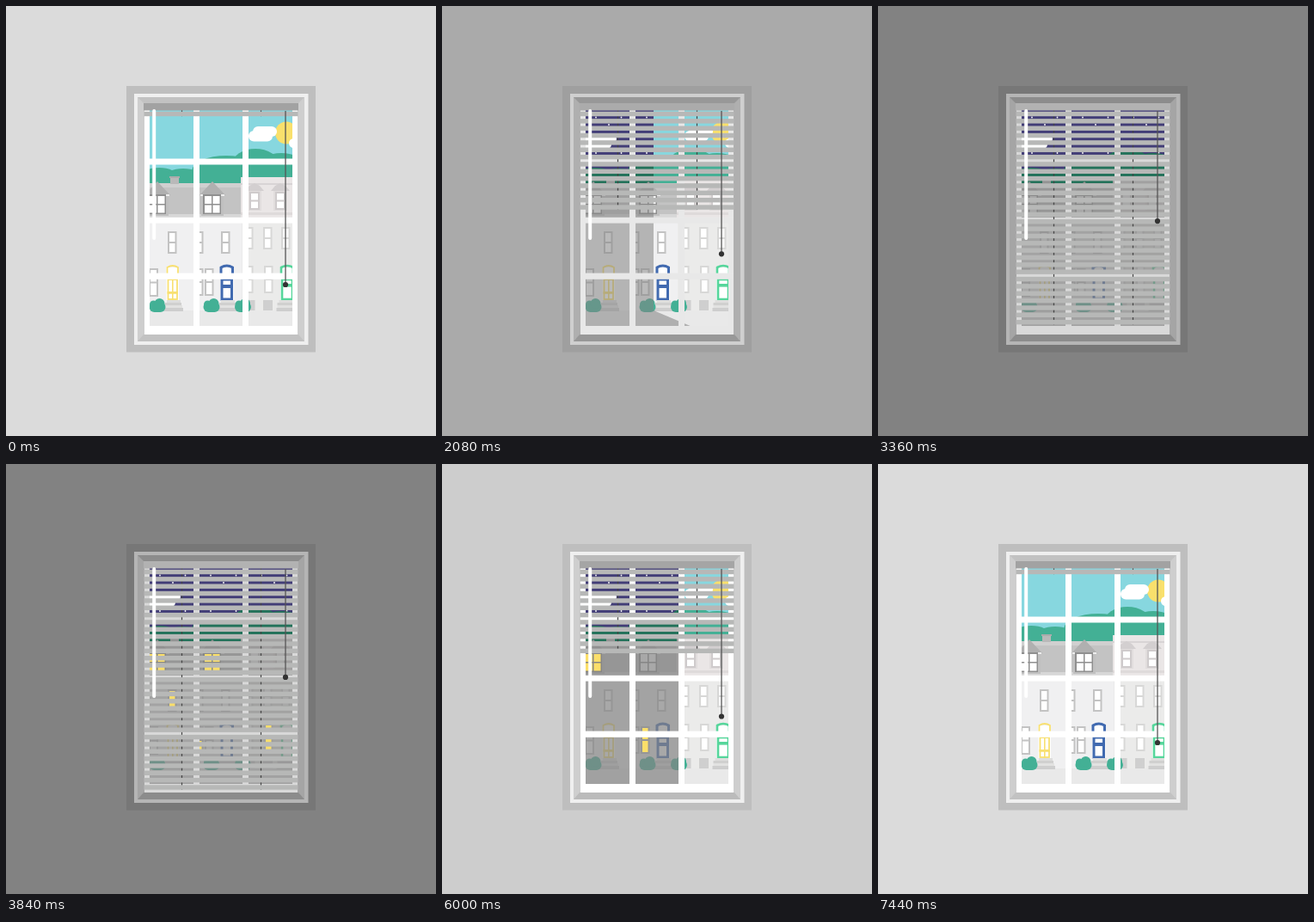
Animation of 500 by 500 pixels, one loop 7680 ms. Source, as an HTML page with a canvas:

```html
<!DOCTYPE html>
<html lang="en">
<head>
<meta charset="utf-8">
<title>Window blind</title>
<style>
html, body { margin: 0; width: 100%; height: 100%; overflow: hidden; background: #dbdbdb; }
canvas { display: block; width: 100vw; height: 100vh; }
</style>
</head>
<body>
<canvas id="stage" width="500" height="500"></canvas>
<script>
const ctx = document.getElementById('stage').getContext('2d');
const LOOP = 7680, STEP = 80, PITCH = 8.35, SLATS = 30;
const LIT = '#fbdf6a';
let dim = 0; // how far scene colours are mixed towards night grey

const clamp = (v, lo, hi) => Math.min(hi, Math.max(lo, v));
const grey = v => { v = Math.round(v); return `rgb(${v},${v},${v})`; };

// Linear interpolation through [time, value] points
function track(t, keys) {
  if (t <= keys[0][0]) return keys[0][1];
  for (let i = 1; i < keys.length; i++) {
    const [t0, a] = keys[i - 1], [t1, b] = keys[i];
    if (t <= t1) return a + (b - a) * (t - t0) / (t1 - t0);
  }
  return keys[keys.length - 1][1];
}

function tint(hex) {
  if (!dim) return hex;
  const n = parseInt(hex.slice(1), 16);
  const mix = s => Math.round(((n >> s) & 255) * (1 - dim) + 130 * dim);
  return `rgb(${mix(16)},${mix(8)},${mix(0)})`;
}

function box(c, x, y, w, h) {
  ctx.fillStyle = c;
  ctx.fillRect(x, y, w, h);
}
const rect = (c, x, y, w, h) => box(tint(c), x, y, w, h);

function shape(c, pts) {
  ctx.fillStyle = c;
  ctx.beginPath();
  for (let i = 0; i < pts.length; i += 2) ctx.lineTo(pts[i], pts[i + 1]);
  ctx.fill();
}
const poly = (c, ...pts) => shape(tint(c), pts);

function oval(c, x, y, rx, ry = rx) {
  ctx.fillStyle = c;
  ctx.beginPath();
  ctx.ellipse(x, y, rx, ry, 0, 0, Math.PI * 2);
  ctx.fill();
}

function pill(c, x, y, w, h) {
  ctx.fillStyle = c;
  ctx.beginPath();
  ctx.roundRect(x, y, w, h, h / 2);
  ctx.fill();
}

function line(c, w, x0, y0, x1, y1, cap = 'butt') {
  ctx.strokeStyle = c;
  ctx.lineWidth = w;
  ctx.lineCap = cap;
  ctx.beginPath();
  ctx.moveTo(x0, y0);
  ctx.lineTo(x1, y1);
  ctx.stroke();
}

function sashWindow(x, y, w, h, frame, lit) {
  rect(frame, x, y, w, h);
  const pane = lit ? LIT : tint('#ffffff'), ph = (h - 6) / 2;
  box(pane, x + 2, y + 2, w - 4, ph);
  box(pane, x + 2, y + 4 + ph, w - 4, ph);
}

function dormer(x, lit) {
  poly('#b0b0b0', x - 15, 220, x, 204, x + 15, 220);
  rect('#c0c0c0', x - 13, 219, 26, 25);
  rect('#ededed', x - 14, 219, 28, 2);
  rect('#8f8f8f', x - 11, 219, 21, 23);
  for (const dx of [-9, 0.5])
    for (const dy of [221, 231.5]) box(lit ? LIT : tint('#ffffff'), x + dx, dy, 8, 9);
}

function smallDormer(x) {
  poly('#d3cfd0', x - 11, 215, x - 6, 209, x, 206, x + 6, 209, x + 11, 215);
  rect('#e1dddd', x - 8, 215, 16, 23);
  sashWindow(x - 6, 216, 12, 21, '#cfcbcc');
}

function door(c, x, w, weight, bar) {
  rect('#ffffff', x, 304, w, 38);
  ctx.strokeStyle = tint(c);
  ctx.lineWidth = weight;
  ctx.beginPath();
  ctx.moveTo(x + 1, 317);
  ctx.lineTo(x + 1, 304);
  ctx.quadraticCurveTo(x + w / 2, 300, x + w - 1, 304);
  ctx.lineTo(x + w - 1, 317);
  ctx.strokeRect(x + 2, 318, w - 4, 23);
  ctx.stroke();
  rect(c, x + 1, bar, w - 2, weight + 1);
}

function steps(x) {
  rect('#dededd', x + 3, 342, 16, 3);
  rect('#d0d0cf', x + 1, 345, 19, 3);
  rect('#e2e2e1', x + 1, 348, 20, 3);
  rect('#cecece', x, 351, 22, 4);
}

function bush(x) {
  const c = tint('#43b095');
  pill(c, x, 344, 19, 12);
  oval(c, x + 5, 347, 4.5);
  oval(c, x + 12, 346, 6);
}

function sky(night) {
  box(night ? '#423d77' : '#87d7df', 160, 115, 180, 95);
  if (night) {
    for (let i = 0; i < 6; i++) {
      const x = 179 + 29.5 * i;
      oval('#fff', x, 129.5, 0.9);
      oval('#fff', x, 171, 0.9);
      if (i % 2 === 0) oval('#fff', x + 15, 138, 0.9);
    }
    pill('#fff', 163, 150, 40, 9);
    pill('#fff', 160, 156, 37, 10);
  } else {
    oval('#f9e06c', 326, 147.5, 13);
    pill('#fff', 287, 140, 28, 12);
    pill('#fff', 282, 145, 28, 12.5);
    pill('#fff', 329, 154, 20, 11);
  }
  const green = night ? '#23725a' : '#43b095';
  oval(green, 178, 199, 22, 11);
  oval(green, 206, 200, 22, 11);
  oval(green, 256, 192, 40, 18);
  oval(green, 290, 184, 27, 18);
  oval(green, 320, 186, 28, 15);
  box(green, 219, 184, 120, 25);
  box(green, 160, 194, 65, 14);
}

function houses(lights) {
  // roofs
  rect('#d0d0d0', 160, 206, 114, 40);
  rect('#c3c3c3', 160, 211, 114, 35);
  rect('#b9b9b9', 191, 198, 10, 9);
  rect('#ababab', 190, 198, 12, 2);
  rect('#d7d7d7', 160, 242, 114, 5);
  dormer(176, lights.attic1);
  dormer(240, lights.attic2);
  rect('#eae6e6', 273, 199, 67, 50);
  rect('#d8d4d5', 273, 206, 67, 2);
  rect('#dedada', 273, 240, 67, 3);
  smallDormer(289);
  smallDormer(319);

  // walls
  rect('#f0f0f1', 160, 247, 114, 108);
  rect('#ebebea', 274, 247, 66, 108);
  rect('#e9e9e9', 160, 354, 180, 20);

  sashWindow(188, 262, 10.5, 26, '#c3c3c3', lights.upper1);
  sashWindow(219, 262, 10.5, 26, '#c3c3c3');
  sashWindow(250, 262, 10.5, 26, '#c3c3c3');
  sashWindow(166, 305, 11, 33, '#c3c3c3');
  sashWindow(219, 305, 10.5, 32, '#c3c3c3', lights.hall);
  sashWindow(231, 305, 10.5, 32, '#c3c3c3', lights.parlour);
  for (const x of [277, 299, 320]) sashWindow(x, 257, 10.5, 26, '#d8d8d7');
  sashWindow(277, 302, 10.5, 32, '#d8d8d7');
  sashWindow(300, 302, 10.5, 32, '#d8d8d7', lights.corner);
  rect('#cfcfcf', 279, 342, 10.5, 12);
  rect('#cfcfcf', 299, 342, 11, 12);

  door('#f8e071', 186.5, 14.5, 1.8, 332);
  rect('#f8e071', 193, 318, 1.6, 24);
  door('#416ab0', 249, 15.5, 3, 324);
  door('#56d69b', 319, 16, 2.6, 323);
  steps(184);
  steps(247);
  steps(314.5);
  bush(166.5);
  bush(229.5);
  bush(266);
}

function scene(night, shade, lights) {
  dim = 0;
  sky(night);
  dim = night ? shade : 0;
  houses(lights);
  dim = 0;
}

function view(t) {
  const edge = track(t, [[160, 167], [2080, 246], [3360, 334], [5440, 334], [6000, 278], [7120, 167]]);
  const shade = track(t, [[2080, 0.55], [3360, 0.7]]);
  const on = (a, b) => t >= a && t < b;
  ctx.save();
  ctx.beginPath();
  ctx.rect(161, 121, 178, 252);
  ctx.clip();
  scene(false, 0, {});
  if (edge > 167) {
    const slant = t < 4000 ? Math.min(45, (edge - 167) * 0.57) : 0;
    ctx.beginPath();
    ctx.moveTo(160, 115);
    ctx.lineTo(edge, 115);
    ctx.lineTo(edge, 354);
    ctx.lineTo(edge + slant, 373);
    ctx.lineTo(160, 373);
    ctx.clip();
    scene(true, shade, {
      attic1: on(3680, 7200),
      attic2: on(3680, 4640),
      upper1: on(3760, 4320),
      hall: on(3840, 4480),
      corner: on(3680, 4800),
      parlour: on(5360, 7200)
    });
  }
  ctx.restore();
}

function sash(c) {
  box(c, 161, 121, 6, 261);
  box(c, 333, 121, 6, 261);
  box(c, 218, 121, 7, 252);
  box(c, 275, 121, 7, 252);
  box(c, 161, 177.5, 178, 7);
  box(c, 161, 245.8, 178, 6.8);
  box(c, 161, 310.6, 178, 7.2);
  box(c, 161, 372, 178, 10);
}

function blind(n, level) {
  const end = 128.2 + PITCH * n;
  for (const x of [204.5, 296.5]) line('#444', 1.2, x, 121, x, end);
  for (let i = 0; i <= n; i++) box('#b7b8b7', 160.5, 122.8 + PITCH * i, 179, 5.4);
  box(grey(track(level, [[130, 178], [219, 162]])), 160, 113, 180, 8.5);
  line('#fff', 4, 172.2, 122, 172.2, 270, 'round');
  const knob = 324 - 2.91 * n + 0.0125 * n * n;
  line('#555', 1.3, 325, 122, 325, knob);
  oval('#333', 325, knob, 3.1);
}

function draw(now) {
  const t = Math.floor(now % LOOP / STEP) * STEP;
  const level = track(t, [[1760, 219], [2080, 170], [2640, 140], [3360, 130],
    [4480, 130], [5040, 155], [6000, 205], [6280, 219]]);
  const down = (t - 1040) / STEP, up = SLATS - (t - 4480) / STEP;
  const n = clamp(t < 4000 ? down : up, 0, SLATS);

  box(grey(level), 0, 0, 500, 500);
  box(grey(Math.min(190, level - 11)), 140, 93, 220, 309.5);
  box(grey(clamp(level + 37, 181, 239)), 149, 102, 202.5, 292);
  box(grey(clamp(level + 5, 165, 206)), 153, 106, 194, 284);
  const lip = grey(clamp(level - 18, 140, 194));
  shape(lip, [153, 106, 347, 106, 340, 113, 160, 113]);
  shape(lip, [153, 390, 347, 390, 340, 382, 160, 382]);
  view(t);
  sash(grey(clamp(level + 62, 217, 255)));
  blind(n, level);
}

const start = performance.now();
function tick() {
  draw(performance.now() - start);
  requestAnimationFrame(tick);
}
tick();
</script>
</body>
</html>
```
